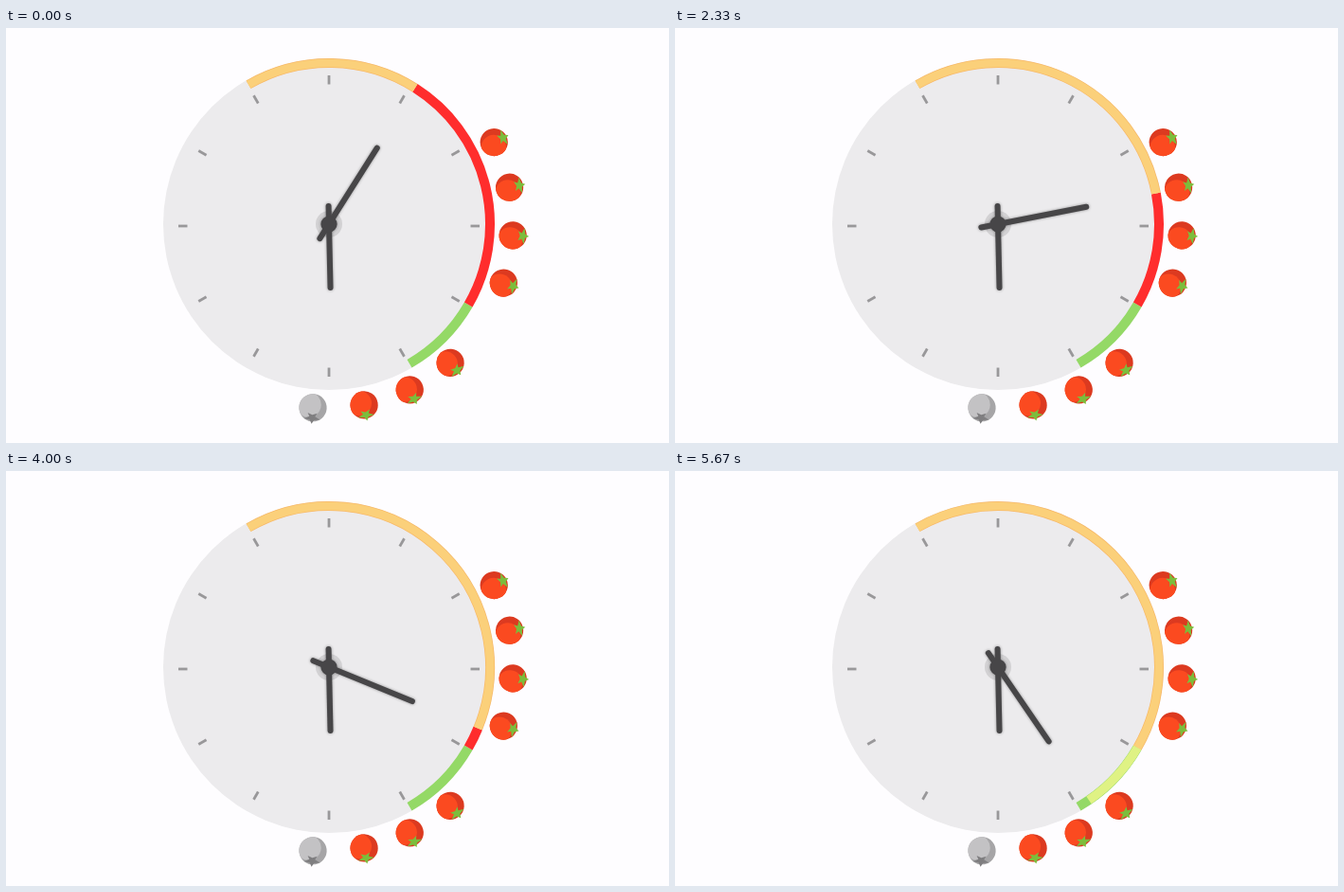
These frames come from a looping animation (700 px wide and 438 px high, 5.74 s). An HTML page:

```html
<!DOCTYPE html>
<html lang="en">
<head>
<meta charset="utf-8">
<title>Tomato timer clock</title>
<style>
  html, body { margin: 0; width: 100%; height: 100%; overflow: hidden; background: #fefdff; }
  svg { display: block; width: 700px; height: 438px; }
  .arc { fill: none; }
  .hand { stroke: #474648; stroke-width: 6; stroke-linecap: round; }
  .shadow { filter: drop-shadow(0 0 1.5px rgba(0, 0, 0, .4)); }
</style>
</head>
<body>
<svg viewBox="0 0 700 438">
  <defs>
    <clipPath id="body"><circle r="14.6"/></clipPath>
  </defs>
  <circle cx="341" cy="207" r="175" fill="#ecebed"/>
  <g id="ticks" stroke="#99989a" stroke-width="2.8"></g>
  <g id="arcs" class="arc"></g>
  <g id="tomatoes"></g>
  <circle cx="341" cy="207" r="14" fill="#d2d1d3"/>
  <g class="shadow" transform="translate(341 207)">
    <line class="hand" y1="19" y2="-67" transform="rotate(178.7)"/>
    <line class="hand" id="minute" y1="18" y2="-95"/>
    <circle r="8.6" fill="#474648"/>
  </g>
</svg>
<script>
const CX = 341, CY = 207, LOOP = 5740, LAST_STEP = 85;
const START = 32.3, DEG_PER_STEP = 4 / 3;
const WORK_FROM = -30, WORK_TO = 120, REST_TO = 150;

const byId = id => document.getElementById(id);

function add(parent, tag, attrs) {
  const el = document.createElementNS('http://www.w3.org/2000/svg', tag);
  for (const key in attrs) el.setAttribute(key, attrs[key]);
  return parent.appendChild(el);
}

// Angles run clockwise from twelve o'clock.
function rim(deg) {
  const a = deg * Math.PI / 180;
  return `${CX + 170 * Math.sin(a)} ${CY - 170 * Math.cos(a)}`;
}

function arcPath(from, to) {
  return to > from ? `M${rim(from)}A170 170 0 0 1 ${rim(to)}` : '';
}

function addArc(color, width) {
  return add(byId('arcs'), 'path', { stroke: color, 'stroke-width': width });
}

function addTomato(deg, skin, shade, leaf) {
  const g = add(byId('tomatoes'), 'g', {
    transform: `translate(${CX} ${CY}) rotate(${deg}) translate(194.5 0)`
  });
  add(g, 'circle', { r: 14.6, fill: shade });
  add(g, 'circle', { cx: -2.8, cy: 4.8, r: 13.2, fill: skin, 'clip-path': 'url(#body)' });
  add(g, 'path', {
    d: 'M17 0L13 2.2L12 8.6L9.3 3L5.6 5L7.6 0L5.6 -5L9.3 -3L12 -8.6L13 -2.2Z',
    fill: leaf
  });
}

for (let deg = 0; deg < 360; deg += 30) {
  add(byId('ticks'), 'line', {
    x1: CX, x2: CX, y1: 50, y2: 59.5, transform: `rotate(${deg} ${CX} 209)`
  });
}

for (const deg of [-26.4, -11.5, 3.5, 18.6, 48.8, 64, 79]) {
  addTomato(deg, '#fb4a20', '#dc3a20', '#7cbd3c');
}
addTomato(95, '#c3c2c4', '#a6a5a7', '#7f7e80');

const rest = addArc('#94d966', 10);
const work = addArc('#ff2d2d', 10);
const workEdge = addArc('#f8b968', 10);
const workDone = addArc('#fbd07a', 8.6);
const restDone = addArc('#dff284', 9.4);
rest.setAttribute('d', arcPath(WORK_TO, REST_TO));

// Fifteen steps a second, held for 70, 60 and 70 ms in turn.
function stepAt(ms) {
  const part = ms % 200;
  const step = Math.floor(ms / 200) * 3 + (part >= 70) + (part >= 130);
  return Math.min(step, LAST_STEP);
}

function draw(ms) {
  const deg = START + stepAt(ms) * DEG_PER_STEP;
  const done = arcPath(WORK_FROM, Math.min(deg, WORK_TO));
  byId('minute').setAttribute('transform', `rotate(${deg})`);
  work.setAttribute('d', arcPath(deg, WORK_TO));
  workEdge.setAttribute('d', done);
  workDone.setAttribute('d', done);
  restDone.setAttribute('d', arcPath(WORK_TO, deg));
}

const began = performance.now();
function tick() {
  draw((performance.now() - began) % LOOP);
  requestAnimationFrame(tick);
}
draw(0);
requestAnimationFrame(tick);
</script>
</body>
</html>
```
